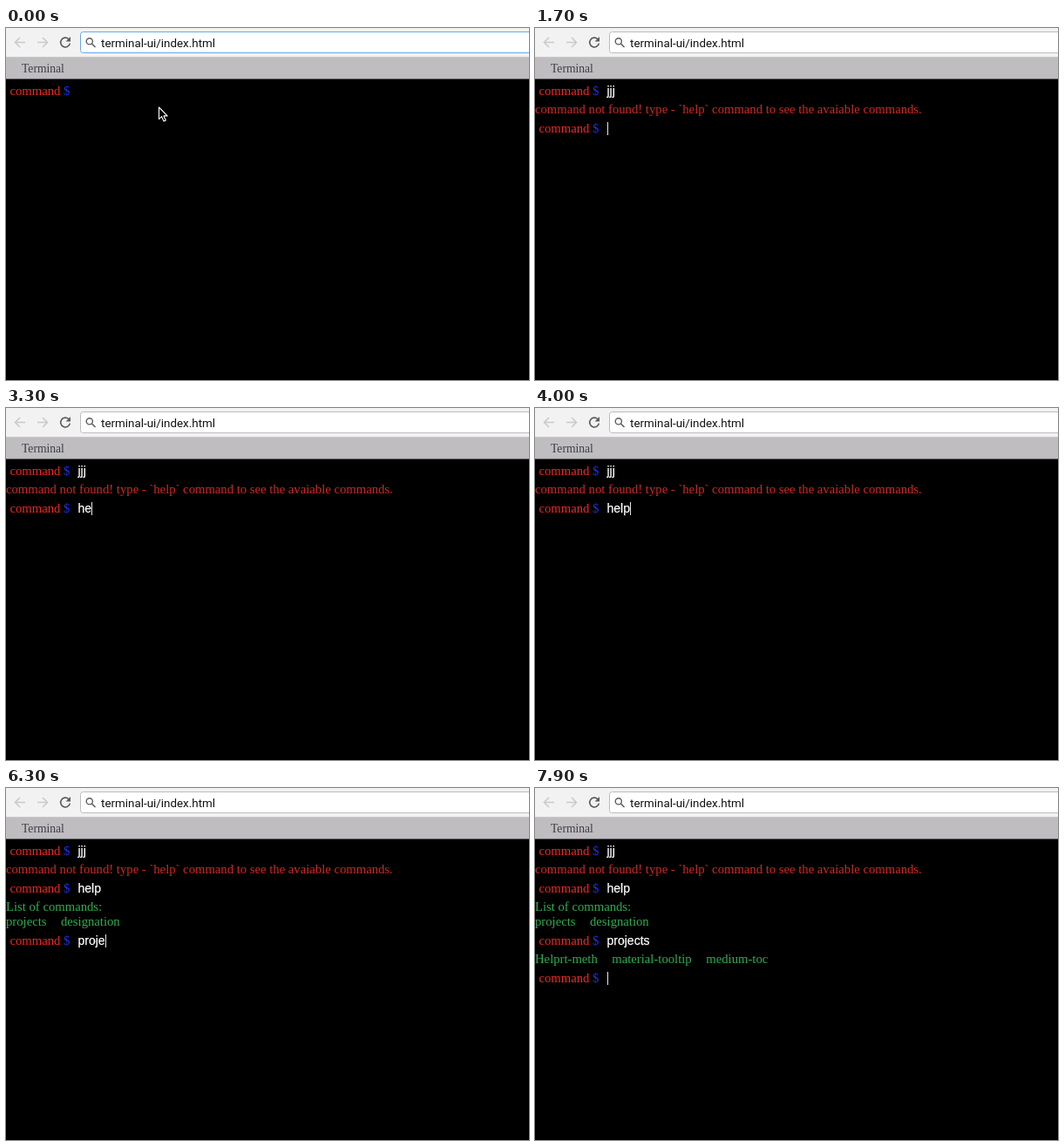
An HTML page for the animation above (8000 ms loop, 600 by 404 pixels).

```html
<!DOCTYPE html>
<html lang="en">
<head>
<meta charset="utf-8">
<title>Terminal</title>
<style>
  html, body { margin: 0; width: 100%; height: 100%; overflow: hidden; background: #000; }
  svg { display: block; width: 100%; height: 100%; }
  text { white-space: pre; }
  .serif { font: 14.7px "Liberation Serif", "Times New Roman", serif; }
  .typed { font: 14px "Liberation Sans", Arial, sans-serif; fill: #fff; stroke: #fff; stroke-width: .25; }
  .url { font: 13.4px Roboto, "Liberation Sans", sans-serif; fill: #111; }
  .icon { fill: none; stroke-width: 1.6; }
</style>
</head>
<body>
<svg id="stage" viewBox="0 0 600 404">
  <rect width="600" height="404"/>
  <rect width="600" height="34" fill="#f3f2f3"/>
  <rect id="field" x="85.5" y="4.5" width="530" height="24" rx="3" fill="#fff"/>
  <g class="icon" stroke="#cbcacb">
    <path d="M22 16.5H11M16 11l-5.5 5.5 5.5 5.5"/>
    <path d="M36 16.5h11M42 11l5.5 5.5-5.5 5.5"/>
  </g>
  <path class="icon" stroke="#5d5d60" d="M72 12.8A5.4 5.4 0 1 0 73.4 17.6"/>
  <path fill="#5d5d60" d="M74 10v5.4h-5.4z"/>
  <g class="icon" stroke="#5d5d60">
    <circle cx="95.8" cy="15.3" r="3.6" stroke-width="1.4"/>
    <path d="M98.5 18l4 4"/>
  </g>
  <text class="url" x="109" y="21.5">terminal-ui/index.html</text>
  <rect y="33" width="600" height="25.5" fill="#bfbdc0"/>
  <rect y="33" width="600" height="1" fill="#c9c7c9"/>
  <text class="serif" x="18" y="51" fill="#3d3e45" style="font-size:13.6px">Terminal</text>
  <g id="screen"></g>
  <rect id="caret" width="1" height="15" fill="#e8e8e8"/>
  <path id="arrow" d="M0 0V13.6L3.1 10.7 5.5 16 7.8 15 5.5 9.9H9.6Z" fill="#000" stroke="#fff" stroke-width="1.1" stroke-linejoin="round"/>
  <path id="beam" d="M-2-8Q0-8 0-6.5Q0-8 2-8M0-7V7M-2 8Q0 8 0 6.5Q0 8 2 8" fill="none" stroke="#b5b5b5" stroke-width="1.3"/>
</svg>
<script>
const LOOP = 8000, CLICK = 700, INPUT_X = 82.5;
const RED = '#cf2a22', GREEN = '#2fae50';
const $ = id => document.getElementById(id);
const screen = $('screen'), caret = $('caret'), arrow = $('arrow'), beam = $('beam'), field = $('field');

// Each command: prompt baseline, key times, Enter time and printed [x, y, text] pieces.
const commands = [
  { y: 77, word: 'jjj', keys: [900, 1200, 1300], enter: 1500, color: RED,
    output: [[0, 98, 'command not found! type - `help` command to see the avaiable commands.']] },
  { y: 120, word: 'help', keys: [3000, 3200, 3500, 3700], enter: 4200, color: GREEN,
    output: [[0, 141, 'List of commands:'], [0, 158, 'projects'], [63, 158, 'designation']] },
  { y: 180, word: 'projects', keys: [5000, 5400, 5700, 5900, 6200, 6500, 6700, 6900], enter: 7600, color: GREEN,
    output: [[0, 201, 'Helprt-meth'], [88.3, 201, 'material-tooltip'], [196.3, 201, 'medium-toc']] },
  { y: 223, word: '', keys: [], enter: Infinity, output: [] }
];

function addText(parent, x, y, text, color, cls = 'serif') {
  const node = document.createElementNS('http://www.w3.org/2000/svg', 'text');
  node.setAttribute('class', cls);
  node.setAttribute('x', x);
  node.setAttribute('y', y);
  if (color) node.setAttribute('fill', color);
  node.textContent = text;
  parent.append(node);
  return node;
}

function addGroup() {
  const group = document.createElementNS('http://www.w3.org/2000/svg', 'g');
  screen.append(group);
  return group;
}

commands.forEach((cmd, i) => {
  cmd.start = i ? commands[i - 1].enter : 0;
  cmd.row = addGroup();
  addText(cmd.row, 4.5, cmd.y, 'command', '#ee2a20');
  addText(cmd.row, 66, cmd.y, '$', '#1c31e2');
  cmd.input = addText(cmd.row, INPUT_X, cmd.y, '', null, 'typed');
  cmd.result = addGroup();
  cmd.output.forEach(([x, y, text]) => addText(cmd.result, x, y, text, cmd.color));
});

const show = (node, on) => node.setAttribute('visibility', on ? 'visible' : 'hidden');
const curve = (a, b, c, k) => (1 - k) ** 2 * a + 2 * k * (1 - k) * b + k * k * c;

function drawPointer(t) {
  const p = Math.min(1, Math.max(0, (t - 50) / 550));
  const k = p * p * (3 - 2 * p);
  const x = curve(175.5, 145, 85, k), y = curve(91, 104, 72, k);
  const overInput = y < 82;
  show(arrow, !overInput);
  show(beam, overInput && t < commands[0].keys[1]);
  for (const node of [arrow, beam]) node.setAttribute('transform', `translate(${x} ${y})`);
}

function drawTerminal(t) {
  for (const cmd of commands) {
    show(cmd.row, t >= cmd.start);
    show(cmd.result, t >= cmd.enter);
    const pressed = cmd.keys.filter(time => time <= t);
    cmd.input.textContent = cmd.word.slice(0, pressed.length);
    if (t < cmd.start || t >= cmd.enter) continue;
    const lastEdit = Math.max(cmd.start || CLICK, ...pressed);
    const width = pressed.length ? cmd.input.getComputedTextLength() : 0;
    caret.setAttribute('x', Math.floor(INPUT_X + width + 0.5));
    caret.setAttribute('y', cmd.y - 12);
    show(caret, t >= CLICK && (t - lastEdit) % 1000 < 500);
  }
}

function render(t) {
  field.setAttribute('stroke', t < CLICK ? '#69a7ec' : '#bdbcbd');
  drawTerminal(t);
  drawPointer(t);
}

const began = performance.now();
function tick() {
  render((performance.now() - began) % LOOP);
  requestAnimationFrame(tick);
}
tick();
</script>
</body>
</html>
```
